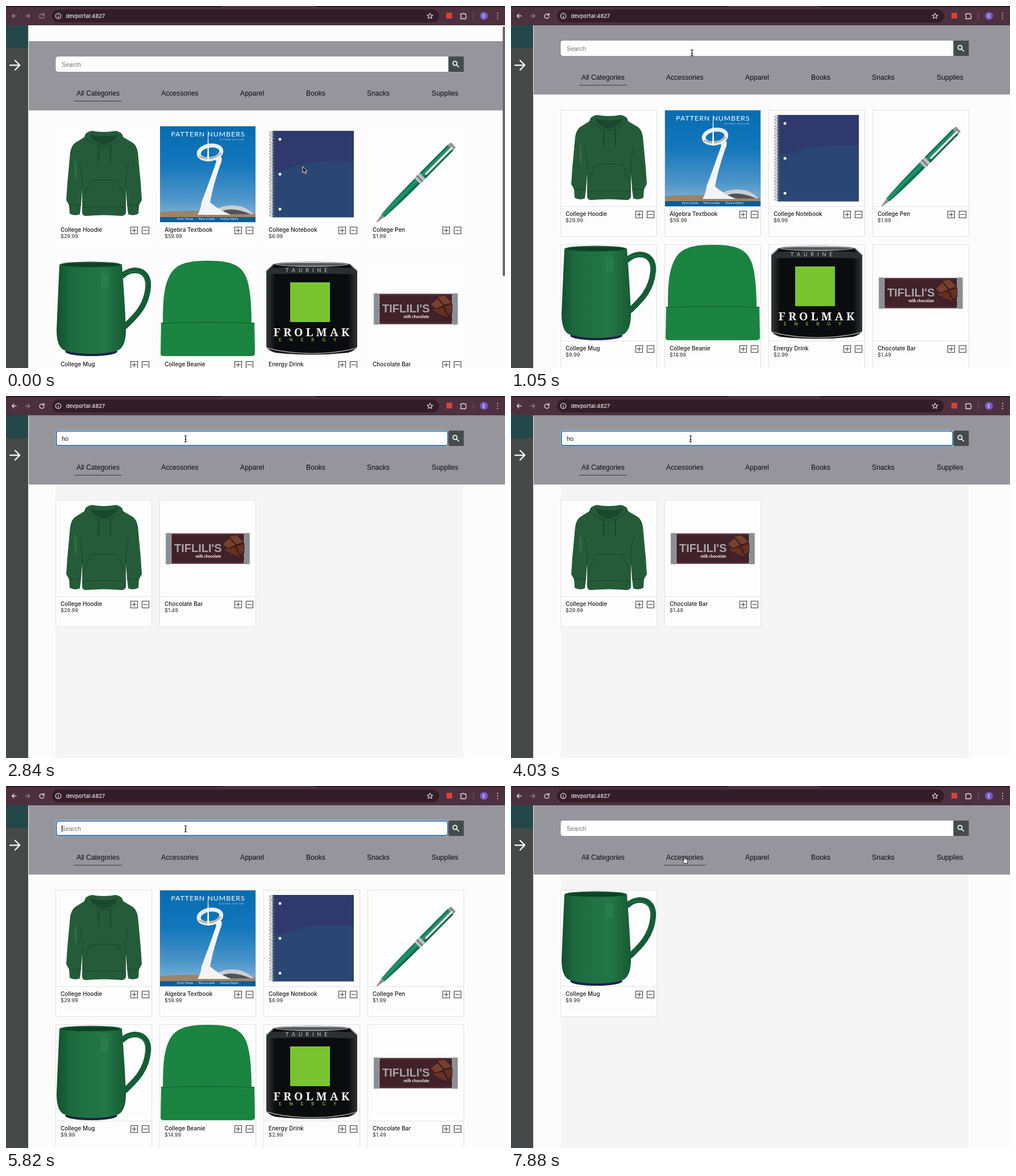
Write an HTML page that moves like this. It is 878 by 638 pixels and loops after 8 s.

```html
<!DOCTYPE html>
<html lang="en">
<head>
<meta charset="utf-8">
<title>College store search</title>
<style>
  html, body { margin: 0; width: 100%; height: 100%; overflow: hidden; background: #fcfcfc; }
  svg { display: block; width: 100vw; height: 100vh; }
  text { white-space: pre; }
  .ui { font-family: Inter, sans-serif; }
  .nav { font: 12.2px "Liberation Sans", Arial, sans-serif; fill: #0b0b0d; }
  .field { font: 10.7px "Liberation Sans", Arial, sans-serif; }
  .name { font: 500 10px Inter, sans-serif; fill: #1c1c1c; }
  .price { font: 9.2px Inter, sans-serif; fill: #2c2c2c; }
  .line { fill: none; stroke-linecap: round; stroke-linejoin: round; }
  .frame { fill: #fdfdfd; stroke: #e2e2e2; }
  .early .frame { stroke: #fcfcfc; }
  .early .tool { opacity: .5; }
</style>
</head>
<body>
<svg id="stage" viewBox="0 0 878 638" preserveAspectRatio="none">
  <defs>
    <linearGradient id="sky" x2="0" y2="1">
      <stop offset="0" stop-color="#066cb0"/><stop offset=".4" stop-color="#1577bb"/>
      <stop offset=".75" stop-color="#4d95c9"/><stop offset="1" stop-color="#8fbad8"/>
    </linearGradient>
    <linearGradient id="glaze">
      <stop offset="0" stop-color="#12512f"/><stop offset=".2" stop-color="#1c6b3f"/>
      <stop offset=".7" stop-color="#237647"/><stop offset="1" stop-color="#165a34"/>
    </linearGradient>
    <linearGradient id="barrel" x2="0" y2="1">
      <stop offset="0" stop-color="#0c6b4a"/><stop offset=".4" stop-color="#1f9a70"/><stop offset="1" stop-color="#075a3b"/>
    </linearGradient>
    <linearGradient id="steel">
      <stop offset="0" stop-color="#777b7e"/><stop offset=".5" stop-color="#dfe2e3"/><stop offset="1" stop-color="#777b7e"/>
    </linearGradient>
    <linearGradient id="tin">
      <stop offset="0" stop-color="#34383a"/><stop offset=".1" stop-color="#0b0c0e"/>
      <stop offset=".9" stop-color="#0b0c0e"/><stop offset="1" stop-color="#303436"/>
    </linearGradient>
    <pattern id="knit" width="4" height="3" patternUnits="userSpaceOnUse">
      <path d="M0 1 L2 2 L4 1" fill="none" stroke="#14763a" stroke-width=".8"/>
    </pattern>
  </defs>

  <g id="page">
    <rect x="40" y="34" width="838" height="604" fill="#fcfcfc"/>
    <rect id="shelf" x="87" y="155" width="718" height="483" fill="#f5f5f5"/>
    <g id="cards"></g>
    <rect x="40" y="34" width="838" height="122" fill="#96959c"/>
    <path d="M778.500 61 H92 Q87.500 61 87.500 66 V83 Q87.500 88 92 88 H778.500Z" fill="#fdfdfd"/>
    <g id="ring" fill="none">
      <rect x="87.500" y="60.500" width="691" height="28" rx="5" stroke="#fff"/>
      <rect x="88.500" y="61.700" width="689" height="25.800" rx="4" stroke="#1459a8" stroke-width="1.800"/>
    </g>
    <rect x="778.500" y="61" width="27" height="27" fill="#454b4b"/>
    <g class="line" stroke="#fff" stroke-width="1.700"><circle cx="790" cy="73" r="3.600"/><path d="M793 76 L796.500 79.500"/></g>
    <text id="hint" class="field" x="98" y="78.500" fill="#757575">Search</text>
    <text id="query" class="field" x="98" y="78.500" fill="#111"></text>
    <rect id="caret" y="69" width="1" height="12" fill="#111"/>
    <g id="tabs" class="nav"></g>
    <rect id="underline" y="139" height="1.200" fill="#45464a"/>
  </g>

  <rect id="scrollbar" x="874" y="36" width="4" height="440" rx="2" fill="#68686a"/>
  <rect y="34" width="39" height="604" fill="#454948"/>
  <rect x="39" y="34" width="1" height="604" fill="#f0f0f0"/>
  <rect y="34" width="39" height="40" fill="#24474a"/>
  <path class="line" d="M7 104.300 H24 M16 96 L24.300 104.300 L16 112.600" stroke="#fff" stroke-width="2.200"/>

  <g class="ui">
    <rect width="878" height="34" fill="#4c303e"/>
    <path d="M0 0 H381 V2 H0Z M545 0 H878 V2 H545Z" fill="#301a24"/>
    <rect x="81" y="6" width="681" height="23" rx="11.500" fill="#331e28"/>
    <g class="line" stroke="#e5d9df" stroke-width="1.300">
      <path class="tool" d="M18 17.500 H10.500 M14 14 L10.500 17.500 L14 21"/>
      <path d="M34.500 17.500 H42 M38.500 14 L42 17.500 L38.500 21" stroke="#92808a"/>
      <path class="tool" d="M66.300 15.500 A4 4 0 1 0 67 18.500 M67 13 V16 H64"/>
      <circle cx="92" cy="17.500" r="4.700"/><path d="M92 17.300 V20 M92 15.100 V15.200"/>
      <path d="M746 12.500 L747.400 15.900 L751 16.200 L748.200 18.500 L749.100 22 L746 20.100 L742.900 22 L743.800 18.500 L741 16.200 L744.600 15.900Z" stroke-width="1.100"/>
      <path d="M800 14 H803 A1.600 1.600 0 0 1 806 14 H809 V17 A1.600 1.600 0 0 1 809 20 V22.500 H800 V20 A1.600 1.600 0 0 0 800 17Z"/>
      <path d="M822.500 12 V23" stroke="#6d5060"/>
      <path d="M865 13 V13.100 M865 17.500 V17.600 M865 22 V22.100" stroke-width="2"/>
    </g>
    <text x="105.500" y="21" font-size="9.400" font-weight="500" fill="#f3e9ee">devportal:4827</text>
    <rect x="775" y="12" width="10" height="10" fill="#d9423a"/>
    <circle cx="841" cy="17.500" r="7" fill="#7557c4"/>
    <text x="841" y="20.800" font-size="8.500" fill="#fff" text-anchor="middle">E</text>
  </g>

  <g id="suggest" class="ui" font-size="9" font-weight="500" fill="#f5eef1">
    <path d="M162 95 L168 89 L174 95Z" fill="#221519"/>
    <rect x="154.500" y="94.500" width="105.500" height="78.500" rx="5" fill="#221519"/>
    <text x="163" y="112.500">hu</text><text x="163" y="136.500">h</text><text x="163" y="161">hgu</text>
  </g>

  <g id="pointer">
    <path id="arrow" d="M0 0 V11 L2.600 8.700 L4.400 12.600 L6.200 11.800 L4.500 8 H8Z" fill="#111" stroke="#fff" stroke-width=".9"/>
    <path id="beam" class="line" d="M-2 -5.500 Q0 -5.500 0 -4 Q0 -5.500 2 -5.500 M0 -4 V4 M-2 5.500 Q0 5.500 0 4 Q0 5.500 2 5.500 M-1 1 H1" stroke="#111" stroke-width="1.200"/>
    <path id="hand" d="M-2.500 -5 Q-1.500 -6.500 -.5 -5 V-1.500 L3.500 -.5 Q4.800 0 4.500 2 L3.500 6.500 H-2 L-5 1.500 Q-5 0 -3.500 .5 L-2.500 2Z" fill="#fff" stroke="#111"/>
  </g>
</svg>
<script>
const $ = id => document.getElementById(id);
const repeat = (n, draw) => Array.from({ length: n }, (_, i) => draw(i)).join('');
const knitted = d => ['#1d8843', 'url(#knit)'].map(fill => `<path d="${d}" fill="${fill}"/>`).join('');

// Product pictures, each drawn in a square of about 169 px.
const art = {
  hoodie: `
    <path d="M50 19 Q51 10 63 8 Q84 12 105 8 Q117 10 118 19 L135 29 Q142 34 144 46 L149 100 L151 130 L146 139 L145 154 Q136 159 127 155 L125 138 L123 112 V153 Q121 158 115 158 Q84 155 53 158 Q47 158 46 153 V112 L44 138 L42 155 Q33 159 24 154 L23 139 L18 130 L20 100 L25 46 Q27 34 34 29Z" fill="#255b39"/>
    <path d="M60 14 Q84 21 109 14 Q104 28 84 33 Q64 28 60 14Z" fill="#1a482e"/>
    <g class="line" stroke="#17432a">
      <path d="M50 19 Q66 33 84 36 Q103 33 118 19 M42 66 Q47 90 46 112 M127 66 Q122 90 123 112 M47 143 Q84 140 122 143 M23 139 L44 139 M125 139 L146 139"/>
      <path d="M60 96 L49 124 M109 96 L120 124 M60 96 Q84 93 109 96"/>
      <path d="M75 34 V63 M96 34 V63" stroke="#0f3320"/>
    </g>
    <path d="M34 56 Q30 78 35 98 Q39 80 34 56Z" fill="#2c6e45"/>`,
  book: `
    <rect width="168" height="169" fill="url(#sky)"/>
    <path d="M0 151 Q60 146 168 154 V161 H0Z" fill="#9c8467"/>
    <path d="M88 155 Q110 134 142 141 Q157 146 164 155Z" fill="#c9ced2"/>
    <path d="M97 155 Q122 138 160 155Z" fill="#4f5558"/>
    <path d="M66 156 Q72 146 73 134 Q86 100 99 62 L96 54 L108 54 Q110 60 106 68 Q94 102 88 134 Q102 147 125 156Z" fill="#f3f4f6"/>
    <g transform="rotate(-10 88 46)" fill="none">
      <ellipse cx="88" cy="46" rx="20" ry="12" stroke="#eceff2" stroke-width="7"/>
      <path d="M68 49 Q86 64 107 50" stroke="#b3a79b" stroke-width="2.500"/>
    </g>
    <path d="M83 62 L84.500 4 L86.500 62Z" fill="#fff"/>
    <rect y="160" width="168" height="9" fill="#0c5d98"/>
    <text x="84.500" y="17.500" text-anchor="middle" font-family="Lato, sans-serif" font-size="12.300" letter-spacing="1" fill="#fff">PATTERN NUMBERS</text>
    <text x="126" y="24.500" text-anchor="middle" font-family="Lato, sans-serif" font-size="4" letter-spacing=".8" fill="#b4d3e8">SECOND EDITION</text>
    <text x="84" y="164.500" text-anchor="middle" font-family="Lato, sans-serif" font-size="5" fill="#e6f0f7">Dorin Halvek   ·   Petra Lundok   ·   Marlow Ebbins</text>`,
  notebook: `
    <rect x="15" y="8" width="143" height="152.500" fill="#2a4672"/>
    <path d="M15 8 H158 V62 Q90 58 55 70 Q40 78 15 78Z" fill="#30396c"/>
    ${repeat(28, i => `<ellipse cx="13.500" cy="${11 + i * 5.4}" rx="4" ry="1.500" fill="none" stroke="#85888e" stroke-width="1.100"/>`)}
    ${[23, 84.5, 146].map(y => `<circle cx="28" cy="${y}" r="2.500" fill="#f7f7f7"/>`).join('')}`,
  pen: `
    <g transform="translate(15 169) rotate(-45.300)">
      <path d="M0 -.7 L17 -3.500 V3.500 L0 .7Z" fill="#8d9295"/>
      <path d="M16 -3.800 Q50 -6.500 103 -6.500 V6.500 Q50 6.500 16 3.800Z" fill="url(#barrel)"/>
      <rect x="102" y="-7.500" width="13" height="15" rx="1.500" fill="#b9bec0"/><rect x="107" y="-7.500" width="2" height="15" fill="#5f6568"/>
      <rect x="115" y="-7" width="70" height="14" fill="url(#barrel)"/>
      <rect x="184" y="-6.500" width="8" height="13" rx="2" fill="#8f9598"/>
      <path d="M121 0 H188 V4 H121 Q118 2 121 0Z" fill="#eceeef" stroke="#6d7376" stroke-width=".8"/>
    </g>`,
  mug: `
    <path d="M117 26 C136 9 165 16 162 47 C159 80 140 98 122 115" class="line" stroke="#155c36" stroke-width="10"/>
    <path d="M121 22 C143 13 160 24 158 46" class="line" stroke="#1f7144" stroke-width="2"/>
    <ellipse cx="62" cy="160" rx="46" ry="8" fill="#1b2347"/>
    <path d="M6 7 Q3 70 1 122 Q1 150 13 157 Q30 164 62 164 Q95 164 111 157 Q123 149 123 122 Q121 70 116 7Z" fill="url(#glaze)"/>
    <ellipse cx="61" cy="7" rx="55" ry="5.500" fill="#1d683e"/>
    <ellipse cx="61" cy="7.300" rx="52" ry="3.800" fill="#0e4226"/>
    <path d="M78 22 L92 24 V46 L79 48Z" fill="#2a7c4d"/>`,
  beanie: `
    ${knitted('M5 112 C5 70 7 48 15 30 C26 4 50 0 84 0 C118 0 142 4 152 30 C159 48 161 80 161 112Z')}
    ${knitted('M2 110 Q84 107 166 110 L167 164 Q166 168 160 168 H7 Q1 168 1 164Z')}
    <path d="M2 110 Q84 107 166 110" class="line" stroke="#126331" stroke-width="1.500"/>`,
  drink: `
    <path d="M16 6 Q84 -3 152 6 L164 17 V151 Q162 158 148 162 Q84 169 20 162 Q6 158 4 151 V17Z" fill="url(#tin)"/>
    <ellipse cx="84" cy="6" rx="66" ry="4.500" fill="url(#steel)"/>
    <ellipse cx="84" cy="6.500" rx="60" ry="2.800" fill="#55595c"/>
    <path d="M16 7 L4 18 M152 7 L164 18 M7 154 Q40 163 84 163.500 Q130 163 162 154" class="line" stroke="#9ba0a2" stroke-width="1.500"/>
    <path d="M12 13 Q84 8 157 13 L163 24 Q84 21 5 24Z" fill="#2b2f32"/>
    <text x="38" y="20" font-family="Lato, sans-serif" font-size="9" letter-spacing="6" fill="#c9cccd">TAURINE</text>
    <rect x="46" y="38" width="70" height="70" fill="#78c531"/>
    <text x="86" y="133" text-anchor="middle" font-family="'Noto Serif', serif" font-weight="700" font-size="20" letter-spacing="5" fill="#f2f2f2">FROLMAK</text>
    <text x="26" y="142" font-family="Lato, sans-serif" font-weight="700" font-size="8" letter-spacing="14" fill="#78b93a">ENERGY</text>`,
  chocolate: `
    <rect x="18" y="58.500" width="132" height="53" fill="#41212a"/>
    <path d="M18 58.500 H150 V61 H18Z M18 109 H150 V111.500 H18Z" fill="#55303a"/>
    ${[10, 148].map(x => `<rect x="${x}" y="57.500" width="10" height="55" fill="#8b8f94"/><path d="M${x} 58 V112 M${x + 10} 58 V112" stroke="#d3d6d8" stroke-dasharray="2 2"/>`).join('')}
    <g stroke="#38160f" fill="#75402f">
      <path d="M121 63 L135 61 L148 74 L134 78Z M110 77 L122 66 L133 79 L119 85Z"/>
      <path d="M134 80 L148 76 V92 L140 96Z M110 86 L132 82 L140 97 L148 103 L126 95Z" fill="#633224"/>
    </g>
    <text x="25" y="90.500" font-family="'Liberation Sans', Arial, sans-serif" font-weight="700" font-size="20" fill="#a8a4a8">TIFLILI'S</text>
    <text x="62.500" y="100.500" font-family="Lato, sans-serif" font-weight="700" font-size="7" fill="#fff">milk chocolate</text>`
};

const products = [
  ['College Hoodie', '29.99', 'hoodie', 'Apparel'],
  ['Algebra Textbook', '59.99', 'book', 'Books'],
  ['College Notebook', '6.99', 'notebook', 'Supplies'],
  ['College Pen', '1.99', 'pen', 'Supplies'],
  ['College Mug', '9.99', 'mug', 'Accessories'],
  ['College Beanie', '14.99', 'beanie', 'Apparel'],
  ['Energy Drink', '2.99', 'drink', 'Snacks'],
  ['Chocolate Bar', '1.49', 'chocolate', 'Snacks']
];
const tabs = [['All Categories', 124], ['Accessories', 273], ['Apparel', 412], ['Books', 528], ['Snacks', 635], ['Supplies', 749]];

$('cards').innerHTML = products.map(([name, price, picture]) => `<g>
  <rect class="frame" width="169" height="223"/>
  <g transform="translate(.5 .5)">${art[picture]}</g>
  <path class="frame" d="M0 170 H169"/>
  <text class="name" x="8.500" y="186">${name}</text>
  <text class="price" x="8.500" y="197.500">$${price}</text>
  <g fill="none" stroke="#3c3c3c" stroke-width="1.100">
    <path d="M132 178 h12 v12 h-12Z M134 184 h8 M138 180 v8"/>
    <path d="M152 178 h12 v12 h-12Z M154 184 h8"/>
  </g></g>`).join('');
$('tabs').innerHTML = tabs.map(([label, x]) => `<text x="${x}" y="129.500">${label}</text>`).join('');

// [time, query, caret shown]
const typing = [
  [0, '', 0], [1500, '', 1], [1950, 'h', 1], [2250, 'ho', 1], [2840, 'ho', 0], [3440, 'ho', 1],
  [4030, 'ho', 0], [4180, 'h', 1], [4330, '', 1], [4920, '', 0], [5370, 'h', 1], [5820, '', 1],
  [5970, 'h', 1], [6120, 'ho', 1], [6570, 'ho', 0], [6720, 'h', 1], [6870, '', 1], [7320, '', 0]
];
// [time, x, y]
const route = [
  [0, 522, 283], [300, 522, 283], [1050, 318.5, 82.5], [1200, 316, 75.5],
  [7140, 316, 75.5], [7590, 306.5, 130], [8000, 306.5, 130]
];
const LOOP = 8000, STEP = 150, BLUR = 7740;
const show = (id, on) => $(id).setAttribute('visibility', on ? 'visible' : 'hidden');
const smooth = p => p * p * (3 - 2 * p);

function pointerAt(t) {
  const i = route.findIndex(([time]) => time > t);
  const [t0, x0, y0] = route[i - 1], [t1, x1, y1] = route[i];
  const p = smooth((t - t0) / (t1 - t0));
  return [x0 + (x1 - x0) * p, y0 + (y1 - y0) * p];
}

function layout(query, category) {
  let slot = 0;
  products.forEach(([name, , , kind], i) => {
    const card = $('cards').children[i];
    const match = name.toLowerCase().includes(query) && (category === 0 || kind === tabs[category][0]);
    card.setAttribute('visibility', match ? 'visible' : 'hidden');
    if (!match) return;
    card.setAttribute('transform', `translate(${87.5 + slot % 4 * 183} ${183.5 + Math.floor(slot / 4) * 237})`);
    slot++;
  });
  show('shelf', slot < products.length);
}

function render(t) {
  const tick = Math.floor(t / STEP + 1e-6) * STEP;
  const [, query, caret] = typing.filter(([time]) => time <= t).pop();
  const focused = t >= 1500 && t < BLUR;
  const category = t >= BLUR ? 1 : 0;

  layout(query, category);
  $('stage').classList.toggle('early', t < STEP);
  const bounce = tick < 600 ? Math.round(28 * Math.exp(-tick / 160)) : 0;
  $('page').setAttribute('transform', `translate(0 ${bounce})`);
  show('scrollbar', t < 900);
  show('ring', focused);
  show('hint', !query);
  show('suggest', t >= 2100 && t < 2250);
  $('query').textContent = query;
  show('caret', focused && caret);
  $('caret').setAttribute('x', 98 + (query ? $('query').getComputedTextLength() : 0));

  const label = $('tabs').children[category];
  $('underline').setAttribute('x', tabs[category][1] - 4);
  $('underline').setAttribute('width', label.getComputedTextLength() + 8);

  const [x, y] = pointerAt(tick);
  const kind = y < 89 ? 'beam' : y > 116 && y < 140 && t > 7000 ? 'hand' : 'arrow';
  ['arrow', 'beam', 'hand'].forEach(id => show(id, id === kind));
  $('pointer').setAttribute('transform', `translate(${x} ${y})`);
}

function frame(now) {
  render(now % LOOP);
  requestAnimationFrame(frame);
}
render(0);
requestAnimationFrame(frame);
</script>
</body>
</html>
```
